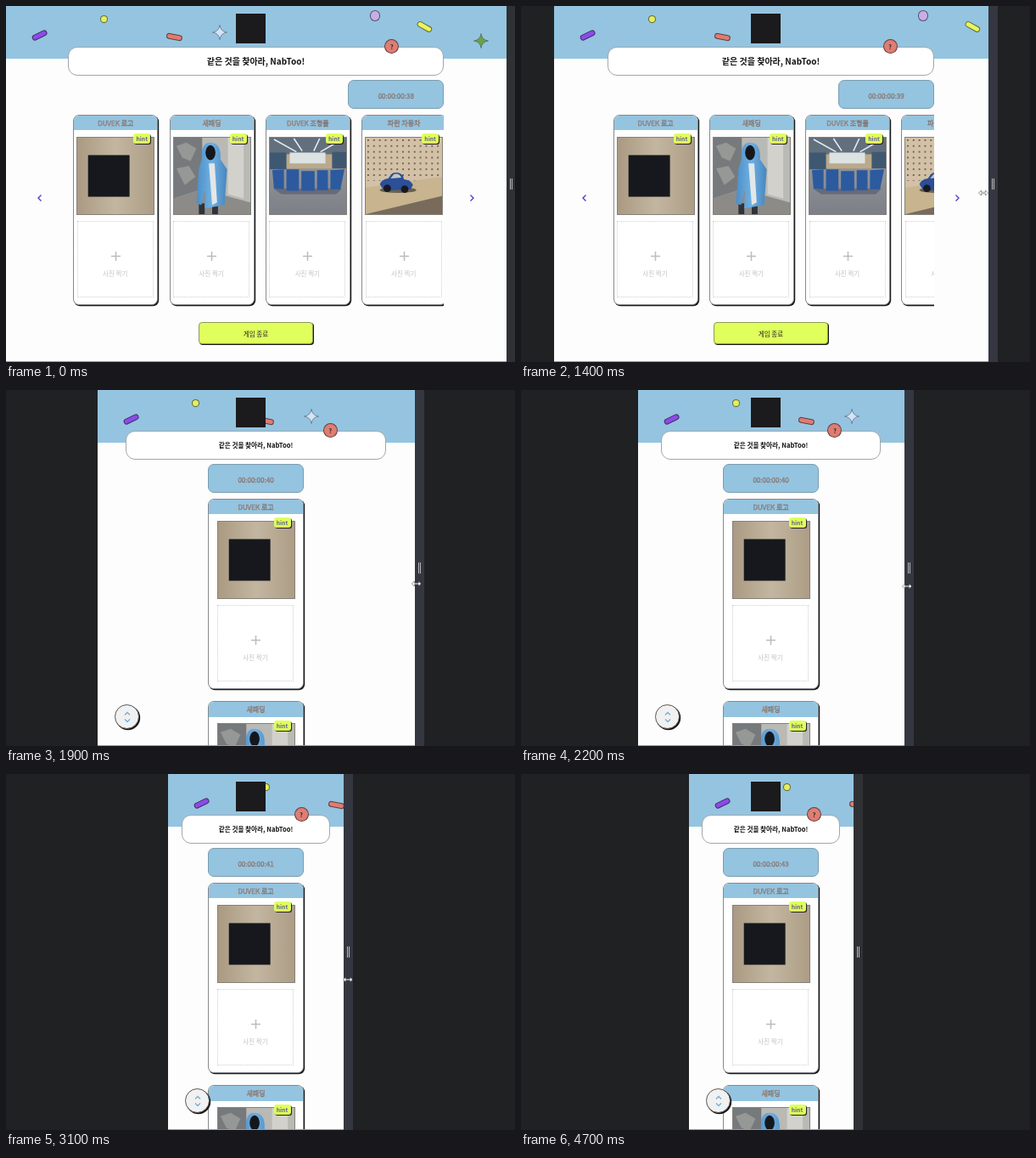
Animation of 600x419 px, one loop 4800 ms. Source, as an HTML page:

```html
<!DOCTYPE html>
<html>
<head>
<meta charset="utf-8">
<title>Responsive matching game</title>
<style>
  :root { --h: 295px; --sky: #94c4e0; --lime: #e0ff5c; --line: #858a8d; --edge: rgba(20, 20, 30, .62); }
  * { box-sizing: border-box; }
  html, body { margin: 0; width: 100%; height: 100%; overflow: hidden; background: #202123; }
  body { font-family: "Noto Sans CJK KR", "Noto Sans CJK", "Noto Sans", sans-serif; }
  svg { display: block; }
  #stage { position: relative; width: 600px; height: 419px; overflow: hidden; background: #202123; }
  #stage * { position: absolute; }
  #stage svg * { position: static; }

  #page { left: calc(294.5px - var(--h)); width: calc(2 * var(--h)); top: 0; height: 419px;
    overflow: hidden; background: #fdfdfd; border-bottom: 1px solid #98999b;
    --half: calc(.75 * var(--h) + .5px); --ball: calc(.506 * var(--h) + 11px); }
  #page.narrow { --half: calc(.8 * var(--h) + 4.3px); --ball: calc(.408 * var(--h) + 11.4px); }
  .sky { left: 0; right: 0; top: 0; height: 62px; background: var(--sky); }

  .pill { width: 19px; height: 6.5px; border: 1px solid var(--edge); border-radius: 3.5px; }
  .dot { border: 1px solid var(--edge); border-radius: 50%; }
  .star { width: 18px; height: 18px; overflow: visible; }
  .logo { left: calc(50% - 23.5px); top: 9px; width: 35px; height: 35px; background: #1b1a1c; }

  .mid { display: flex; align-items: center; justify-content: center; white-space: nowrap; }
  .title { left: calc(50% - var(--half)); width: calc(2 * var(--half)); top: 47.5px; height: 34px;
    background: #fff; border: 1px solid #a3a7a9; border-radius: 11px;
    font-size: 10px; font-weight: 700; color: #111; }
  .narrow .title { font-size: 7.6px; }
  .ask { left: calc(50% + var(--ball) - 8.5px); top: 39px; width: 17px; height: 17px;
    background: #e07d72; font-size: 7px; font-weight: 700; color: #222; }
  .timer { left: calc(50% + var(--half) - 113px); top: 87px; width: 113px; height: 34px;
    background: var(--sky); border: 1px solid #7b9cae; border-radius: 7px; padding-top: 3px; }
  .narrow .timer { left: calc(50% - 56.5px); }
  .label { font-size: 8px; font-weight: 400; color: #d99c8d; -webkit-text-stroke: .4px #74706f; }

  .cards { left: calc(50% - var(--half)); width: calc(2 * var(--half)); top: 122px; height: 240px; overflow: hidden; }
  .narrow .cards { left: calc(50% - 57px); width: 120px; height: 297px; }
  .card { left: calc(6.5px + var(--i) * 113.3px); top: 5.5px; width: 100px; height: 224.5px;
    background: #fff; border: 1px solid var(--line); border-radius: 7px; box-shadow: 1.2px 1.2px 0 #1a1a1a; }
  .narrow .card { left: .5px; top: calc(5.5px + var(--i) * 238.5px); width: 113px; }
  .head { left: 0; right: 0; top: 0; height: 17.5px; background: var(--sky); border-radius: 6px 6px 0 0; }
  .photo { left: calc(50% - 46px); top: 25px; width: 92px; height: 92px; border: 1px solid #85817b; }
  .hint { left: calc(50% + 21px); top: 21.5px; width: 20px; height: 12px; background: var(--lime);
    border-radius: 3px; box-shadow: 1px 1px 0 #222; font-size: 6.8px; font-weight: 600; color: #62628a; }
  .drop { left: calc(50% - 45.5px); top: 124.5px; width: 90px; height: 90px; border: 1px dotted #cfcfcf; }
  .drop svg { left: 39px; top: 35px; }
  .drop p { left: 0; right: 0; top: 52px; height: 16px; margin: 0; font-size: 7.5px; color: #c2c2c2; }

  .arrow { top: 220.5px; margin-left: -5px; }
  .prev { left: calc(50% + 12.8px - .907 * var(--h)); }
  .next { left: calc(50% - 12.8px + .907 * var(--h)); }
  .end { left: calc(50% - 67.5px); top: 372px; width: 135px; height: 26px; background: var(--lime);
    border: 1px solid #8d9a55; border-radius: 4px; box-shadow: 1px 1px 0 #1a1a1a;
    font-size: 7.5px; font-weight: 500; color: #222; }
  .scroll { display: none; left: 20px; top: 369.5px; width: 29px; height: 29px; background: #f1f1f1;
    border: 1px solid #555; border-radius: 50%; box-shadow: 1.2px 1.2px 0 #111; }
  .scroll svg { left: 9px; top: 7px; }
  .narrow .scroll { display: block; }
  .narrow .arrow, .narrow .end { display: none; }

  #bar { left: calc(294.5px + var(--h)); top: 0; width: 11px; height: 419px; background: #303134; }
  #bar.drag { background: #343740; }
  #bar i { left: 4px; top: 203px; width: 3.4px; height: 13px; border: solid #b9babd; border-width: 0 1px; }
  #cursor { left: 0; top: 0; overflow: visible; }
</style>
</head>
<body>
<svg width="0" height="0" style="position:absolute">
  <defs>
    <linearGradient id="wood"><stop stop-color="#ab9a82"/><stop offset=".5" stop-color="#c3b6a0"/><stop offset="1" stop-color="#ad9d86"/></linearGradient>
    <linearGradient id="floor" x2="0" y2="1"><stop stop-color="#a3a29f"/><stop offset="1" stop-color="#7c7f88"/></linearGradient>
    <linearGradient id="coat"><stop stop-color="#4c8fc8"/><stop offset=".5" stop-color="#6fb0e2"/><stop offset="1" stop-color="#4686bf"/></linearGradient>
    <pattern id="pegs" width="7" height="7" patternUnits="userSpaceOnUse"><circle cx="3" cy="3" r="1" fill="#54463a"/></pattern>
  </defs>
  <symbol id="photo0" viewBox="0 0 92 92">
    <path fill="url(#wood)" d="M0 0h92v92H0z"/>
    <path fill="#17181d" d="M13 21h50v50H13z"/>
  </symbol>
  <symbol id="photo1" viewBox="0 0 92 92">
    <path fill="#b9b9b5" d="M0 0h92v92H0z"/>
    <path fill="#777a7c" d="M0 0h34v62L0 73z"/>
    <path fill="#969895" d="M3 10l12-4 12 7-7 15-10-4zM3 37l15-3 8 13-13 10z"/>
    <path fill="#d2d1cc" d="M65 0h19v73l-19-5z"/>
    <path fill="#8c8b88" d="M0 73l34-11 58 16v14H0z"/>
    <path fill="#303239" d="M30 79h7v13h-7zM46 79h7v13h-7z"/>
    <path fill="url(#coat)" d="M34 25q-2-20 11-19 12 1 11 20l8 12-3 43-24 4 1-24-5 20-6-2 3-42z"/>
    <path fill="#e3e7e8" d="M42 31h7l3 47-6 3z"/>
    <ellipse cx="44" cy="18" rx="6" ry="9" fill="#15171d"/>
  </symbol>
  <symbol id="photo2" viewBox="0 0 92 92">
    <path fill="url(#floor)" d="M0 0h92v92H0z"/>
    <path fill="#626f7c" d="M0 0h92v22H0z"/>
    <path stroke="#e6edf0" stroke-width="1.6" d="M5 2l27 15M29 1l10 15M60 1l-7 15M87 2L61 17"/>
    <path fill="#bba98a" d="M0 20h92v17H0z"/>
    <path fill="#dce2e1" d="M24 18h43v13H24z"/>
    <path fill="#3f5872" d="M0 18h20v20H0zM75 17h17v20H75z"/>
    <path fill="#666b78" d="M4 61h83l-7 7H14z"/>
    <path fill="#2c5a9f" d="M3 39l14-1v24L5 61zM20 38h15v26H20zM38 40h16v24H38zM57 39h13v24H57zM73 39l17-1-5 24H73z"/>
  </symbol>
  <symbol id="photo3" viewBox="0 0 92 92">
    <path fill="#d2c1a6" d="M0 0h92v92H0z"/>
    <path fill="url(#pegs)" d="M0 0h92v52H0z"/>
    <path fill="#c8b48f" d="M0 60l92-13v24L0 92z"/>
    <path fill="#786b5b" d="M0 92l92-22v22z"/>
    <ellipse cx="39" cy="63" rx="22" ry="3.500" fill="#6b604c"/>
    <path fill="#2b4f98" d="M17 56q2-6 10-7l5-6q8-3 13 3l1 4q9 1 11 7l-3 5-32 2z"/>
    <path fill="#c3c6c6" d="M30 49l4-5q6-2 9 4z"/>
    <g fill="#171a23"><circle cx="26" cy="61" r="4.500"/><circle cx="47" cy="62" r="4.500"/></g>
  </symbol>
  <symbol id="spark" viewBox="0 0 18 18">
    <path stroke="#4a5560" stroke-width=".6" d="M9 .5Q10 8 17.5 9 10 10 9 17.5 8 10 .5 9 8 8 9 .5z"/>
  </symbol>
</svg>

<div id="stage">
  <div id="page">
    <div class="sky"></div>
    <div class="pill" style="left:30px;top:31px;background:#8c4be6;transform:rotate(-26deg)"></div>
    <div class="dot" style="left:111px;top:10.5px;width:9px;height:9px;background:#e4f05a"></div>
    <div class="pill" style="left:189px;top:33px;background:#e17b70;transform:rotate(11deg)"></div>
    <svg class="star" style="left:243px;top:22px" fill="#d3e3f7"><use href="#spark"/></svg>
    <div class="dot" style="left:429px;top:5px;width:12.5px;height:12.5px;background:#c9aee6"></div>
    <div class="pill" style="left:484px;top:21px;background:#e9f65a;transform:rotate(29deg)"></div>
    <svg class="star" style="left:551px;top:32px" fill="#68a348"><use href="#spark"/></svg>
    <div class="logo"></div>
    <div class="title mid">같은 것을 찾아라, NabToo!</div>
    <div class="ask dot mid">?</div>
    <div class="timer mid label" id="timer"></div>
    <div class="cards" id="cards"></div>
    <svg class="arrow prev" width="10" height="10" fill="none" stroke="#4a43c8" stroke-width="1.4"><path d="M6.500 1.500L3 5l3.500 3.500"/></svg>
    <svg class="arrow next" width="10" height="10" fill="none" stroke="#4a43c8" stroke-width="1.4"><path d="M3.500 1.500L7 5 3.500 8.500"/></svg>
    <div class="end mid">게임 종료</div>
    <div class="scroll"><svg width="10" height="14" fill="none" stroke="#72afd8" stroke-width="1.3"><path d="M2 4.500l3-3 3 3M2 9.500l3 3 3-3"/></svg></div>
  </div>
  <div id="bar"><i></i></div>
  <svg id="cursor" width="1" height="1">
    <path id="resize" fill="#fff" stroke="#333" stroke-width=".5" d="M-5.500 0l3-3v2.200h5V-3l3 3-3 3V.8h-5V3z"/>
    <path id="pointer" fill="#111" stroke="#fff" stroke-width=".7" d="M0-5v10l2.300-2.200L4 6.500l1.500-.7L3.900 2.300H7z"/>
  </svg>
</div>

<script>
  const LOOP = 4800, STEP = 100;
  const $ = id => document.getElementById(id);

  $('cards').innerHTML = ['DUVEK 로고', '새패딩', 'DUVEK 조형물', '파란 자동차'].map((name, i) => `
    <div class="card" style="--i:${i}">
      <div class="head mid label">${name}</div>
      <svg class="photo"><use href="#photo${i}"/></svg>
      <div class="hint mid">hint</div>
      <div class="drop">
        <svg width="11" height="11" stroke="#bdbdbd" stroke-width="1.5"><path d="M5.500 0v11M0 5.500h11"/></svg>
        <p class="mid">사진 찍기</p>
      </div>
    </div>`).join('');

  // time, half of the page width
  const halfKeys = [[0, 295], [900, 295], [1200, 280], [1400, 256], [1700, 206.5], [1800, 197],
    [2200, 157], [2400, 145], [3000, 107], [3100, 103.5], [3600, 97], [LOOP, 97]];
  // time, cursor x, cursor y
  const cursorKeys = [[700, 600, 214], [800, 596, 216], [1200, 566, 218], [1400, 545, 220], [1700, 503, 226],
    [2200, 455, 231], [3000, 406, 241], [3100, 403, 242], [3600, 396, 244], [4200, 497, 240], [4600, 578, 236]];

  function at(keys, t, col = 1) {
    const n = keys.findIndex(k => k[0] > t);
    if (n < 1) return keys[n ? keys.length - 1 : 0][col];
    const a = keys[n - 1], b = keys[n];
    return a[col] + (b[col] - a[col]) * (t - a[0]) / (b[0] - a[0]);
  }

  function draw(now) {
    const t = Math.floor(now % LOOP / STEP) * STEP;
    const half = at(halfKeys, t);
    $('stage').style.setProperty('--h', half + 'px');
    $('page').classList.toggle('narrow', half < 193);
    $('bar').classList.toggle('drag', t > 800 && t < 3700);
    $('timer').textContent = '00:00:00:' + (38 + Math.floor((t + 30) / 930));

    const dragging = t < 3700;
    $('cursor').style.display = t >= 700 && t < 4700 ? 'block' : 'none';
    $('cursor').style.transform = `translate(${at(cursorKeys, t)}px, ${at(cursorKeys, t, 2)}px)`;
    $('resize').style.display = dragging ? '' : 'none';
    $('pointer').style.display = dragging ? 'none' : '';
  }

  function tick() {
    draw(performance.now());
    requestAnimationFrame(tick);
  }
  tick();
</script>
</body>
</html>
```
